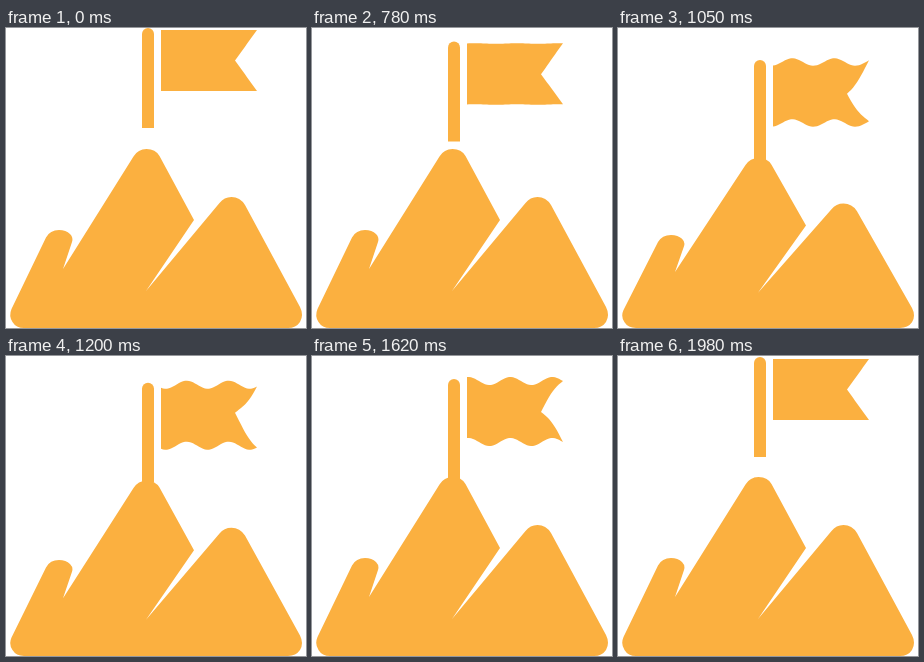
An HTML page that plays this animation: 300x300 px, repeating every 2010 ms.

```html
<!DOCTYPE html>
<html lang="en">
<head>
<meta charset="utf-8">
<title>Summit flag</title>
<style>
  html, body { margin: 0; width: 100%; height: 100%; overflow: hidden; background: #fff; }
  svg { display: block; width: 100%; height: 100%; fill: #fbb040; }
</style>
</head>
<body>
<svg viewBox="0 0 300 300">
  <path id="hills" d="M18 300 Q10 300 6.500 294 Q2.500 288 5.500 281 L40 209.500
    Q44 202 53 202 Q60 202 64 206 Q67.500 209.500 66 214 L57 241
    L127.500 128.500 Q132 121 140.500 121 Q149.500 121 153.500 128 L188 192
    L140 263 L213.500 175 Q218 169 225.500 169 Q234 169 239 177
    L294 279 Q298 287 294 294 Q290 300 282 300 Z"/>
  <path id="pole" d="M136 100 V6 A6 6 0 0 1 148 6 V100 Z"/>
  <path id="flag"/>
</svg>
<script>
const LOOP = 2010, STEP = 30;
const REST = 23;            // drop at which the pole touches the summit
const WAVE = 42;            // ripple length in px, one cycle per second
const PEAK = 179;           // summit height above the ground

const hills = document.getElementById('hills');
const pole = document.getElementById('pole');
const flag = document.getElementById('flag');

const sine = p => (1 - Math.cos(Math.PI * p)) / 2;
const quad = p => p < 0.5 ? 2 * p * p : 1 - 2 * (1 - p) ** 2;
const soft = p => (p + sine(p)) / 2;

// Rows: start, end, from, to, easing
const DROP = [
  [550, 1050, 0, 32, quad],
  [1050, 1320, 32, REST, sine],
  [1620, 2010, REST, 0, soft]
];
const RIPPLE = [
  [0, 540, 0, 0.3, sine],
  [780, 1110, 0.3, 4, sine],
  [1620, 1980, 4, 0, sine]
];

function valueAt(rows, t) {
  let v = rows[0][2];
  for (const [start, end, from, to, ease] of rows) {
    if (t < start) break;
    v = from + (to - from) * ease(Math.min(1, (t - start) / (end - start)));
  }
  return v;
}

const CORNERS = [[155, 2], [251, 2], [229, 32.5], [251, 63], [155, 63]];

function flagPath(t, amp) {
  const crest = 208 + WAVE * (t - 1350) / 1000;
  const points = [];
  CORNERS.forEach(([x, y], i) => {
    const [nx, ny] = CORNERS[(i + 1) % CORNERS.length];
    const n = Math.max(1, Math.round(Math.abs(nx - x) / 2));
    for (let k = 0; k < n; k++) {
      const px = x + (nx - x) * k / n;
      const py = y + (ny - y) * k / n;
      const bend = amp * Math.cos(2 * Math.PI * (px - crest) / WAVE);
      points.push(px.toFixed(2) + ' ' + (py + bend).toFixed(2));
    }
  });
  return 'M' + points.join('L') + 'Z';
}

function draw(now) {
  const t = Math.floor((now % LOOP) / STEP) * STEP;
  const drop = valueAt(DROP, t);
  const squash = 1 - Math.max(0, drop - REST) / PEAK;
  const shift = `translate(0 ${drop})`;
  pole.setAttribute('transform', shift);
  flag.setAttribute('transform', shift);
  flag.setAttribute('d', flagPath(t, valueAt(RIPPLE, t)));
  hills.setAttribute('transform', `translate(0 300) scale(1 ${squash}) translate(0 -300)`);
}

const begin = performance.now();
function tick() {
  draw(performance.now() - begin);
  requestAnimationFrame(tick);
}
tick();
</script>
</body>
</html>
```
